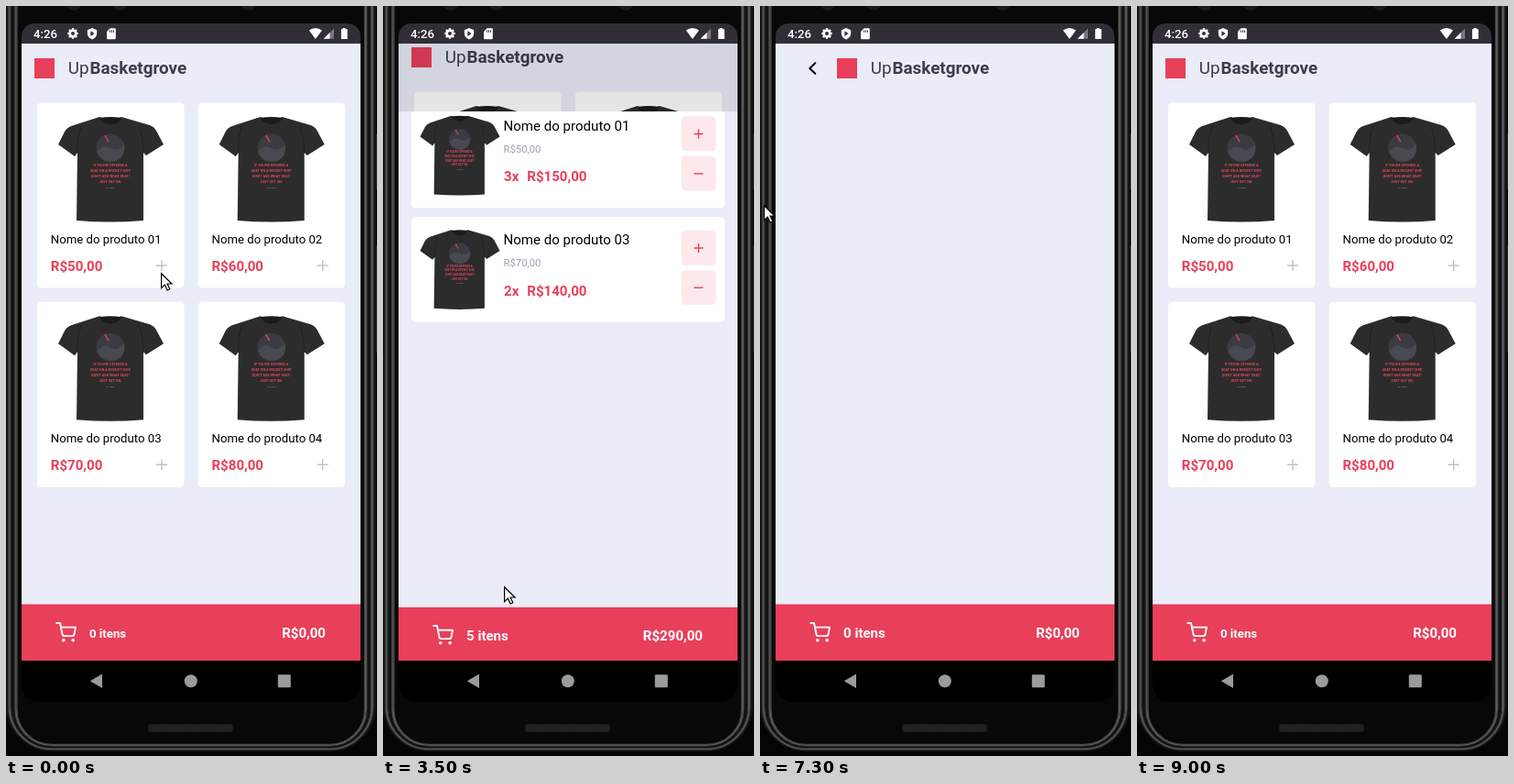
Animation, 405 px wide and 818 px high, one loop 10000 ms. Source, as an HTML page with a canvas:

```html
<!DOCTYPE html>
<html lang="pt">
<head>
<meta charset="utf-8">
<title>UpBasketgrove</title>
<style>
  html, body { margin: 0; width: 100%; height: 100%; overflow: hidden; background: #050505; }
  canvas { display: block; width: 405px; height: 818px; }
</style>
</head>
<body>
<canvas id="stage"></canvas>
<script>
const W = 405, H = 818, LOOP = 10000, STEP = 100;
const RED = '#e83f5b', BG = '#eaecf8', PINK = '#fde9ec', INK = '#3d3d4d';
const SMALL = 13.19, MEDIUM = 15.07, LARGE = 18.84;
const LEFT = 17, TOP = 41, WIDTH = 370, VIEW = 673;  // app area between the system bars
const HOLD = 200, TRAVEL = 400;                      // length of a press, longest pointer trip
const canvas = document.getElementById('stage');
const ratio = window.devicePixelRatio || 1;
canvas.width = W * ratio;
canvas.height = H * ratio;
const c = canvas.getContext('2d');

// Press times of each button
const presses = {
  plus1: [600, 900, 1100], minus1: [5600, 5800, 6400],
  plus3: [2000, 2200], minus3: [4600, 4900]
};
const done = (button, t) => presses[button].filter(p => t >= p + HOLD).length;
const quantity = (id, t) => done('plus' + id, t) - done('minus' + id, t);
const opacity = (button, t) =>
  (presses[button] || []).some(p => t >= p && t < p + HOLD) ? .35 : 1;

// Pointer stops: arrival time and place
const stops = [
  [0, 169, 291], [600, 173, 283], [2000, 166, 495], [3200, 128, 688], [3500, 132, 633],
  [3900, 112, 365], [4100, 72, 64], [4400, 346, 313], [5600, 336, 185], [6900, 0, 19],
  [7100, 4, 217], [7700, 79, 92], [8100, 61, 63], [8900, 76, 21]
];
function pointerAt(t) {
  let [, x, y] = stops[0];
  for (let i = 1; i < stops.length; i++) {
    const [end, px, py] = stops[i];
    const trip = Math.min(TRAVEL, end - stops[i - 1][0]);
    const f = Math.max(0, Math.min(1, (t - end) / trip + 1));
    x += (px - x) * f;
    y += (py - y) * f;
  }
  return [x, y];
}

// Cubic bezier easing of the screen change
const bezier = (s, a, b) => 3 * s * (1 - s) ** 2 * a + 3 * s * s * (1 - s) * b + s ** 3;
function ease(x) {
  if (x <= 0) return 0;
  if (x >= 1) return 1;
  let lo = 0, hi = 1;
  for (let i = 0; i < 20; i++) {
    const mid = (lo + hi) / 2;
    if (bezier(mid, .20833, .25) < x) lo = mid; else hi = mid;
  }
  return bezier(lo, .82, 1);
}
const slide = (t, start) => ease((t - start) / 425);

const money = n => `R$${n},00`;

function box(x, y, w, h, r, fill, stroke, lw = 1) {
  c.beginPath();
  c.roundRect(x, y, w, h, r);
  if (fill) { c.fillStyle = fill; c.fill(); }
  if (stroke) { c.strokeStyle = stroke; c.lineWidth = lw; c.stroke(); }
}
function disc(x, y, r, fill) {
  c.beginPath();
  c.arc(x, y, r, 0, 7);
  c.fillStyle = fill;
  c.fill();
}
function shape(d, fill) {
  c.fillStyle = fill;
  c.fill(new Path2D(d));
}
function line(d, color, lw) {
  c.strokeStyle = color;
  c.lineWidth = lw;
  c.stroke(new Path2D(d));
}
function text(s, x, y, size, weight, color, align = 'left') {
  c.font = `${weight} ${size}px Roboto, sans-serif`;
  c.textAlign = align;
  c.fillStyle = color;
  c.fillText(s, x, y);
}
function placed(x, y, scale, draw) {
  c.save();
  c.translate(x, y);
  c.scale(scale, scale);
  draw();
  c.restore();
}
function faded(alpha, draw) {
  c.save();
  c.globalAlpha = alpha;
  draw();
  c.restore();
}

function shirt(x, y, scale) {
  placed(x, y, scale, () => {
    shape('M45 0L14 10Q9 12 7 16L0 30 18 43 21 39 20 113Q57 116 93 113L93 39 96 42 115 30 107 15Q105 11 100 9L69 0Q57 5 45 0Z', '#2c2c2c');
    shape('M45 1Q57-1 69 1 66 8 57 8 48 8 45 1Z', '#1b1b1b');
    line('M21 39Q20 24 25 10M93 39Q93 24 88 9', '#222', 1.2);
    disc(57, 34, 15.5, '#3b3b42');
    shape('M42 38Q50 29 57 34T72 30Q74 44 62 48 48 50 42 38Z', '#494952');
    line('M51 20L55 27', RED, 1.4);
    ['IF YOU\'RE OFFERED A', 'SEAT ON A ROCKET SHIP,', 'DON\'T ASK WHAT SEAT!', 'JUST GET ON.']
      .forEach((s, i) => text(s, 57, 53.5 + i * 6.1, 3.8, 700, '#e0475d', 'center'));
    text('An Author', 57, 77.5, 2.3, 400, '#aaa', 'center');
  });
}

function sign(x, y, r, color, isPlus) {
  line(`M${x - r} ${y}h${2 * r}` + (isPlus ? `M${x} ${y - r}v${2 * r}` : ''), color, 1.4);
}

function brand(x) {
  box(x, 57, 22, 22, 0, RED);
  text('Up', x + 36.8, 74.2, LARGE, 400, INK);
  text('Basketgrove', x + 60.5, 74.2, LARGE, 700, INK);
}

function cartBar(items, total, size) {
  box(LEFT, 652.6, WIDTH, 62, 0, RED);
  placed(54.3, 672, .942, () => {
    c.lineCap = c.lineJoin = 'round';
    line('M1 1h4l2.68 13.39a2 2 0 0 0 2 1.61h9.72a2 2 0 0 0 2-1.61L23 6H6', '#fff', 2);
    disc(9, 21, 1.9, '#fff');
    disc(20, 21, 1.9, '#fff');
  });
  text(`${items} itens`, 91, 684 + size * .355, size, 700, '#fff');
  text(money(total), 349, 689.3, MEDIUM, 700, '#fff', 'right');
}

function home(items, total, t) {
  box(LEFT, TOP, WIDTH, 700, 0, BG);
  brand(31);
  for (let i = 0; i < 4; i++) {
    const x = 34 + (i % 2) * 175.7, y = 105.5 + (i >> 1) * 217.2;
    box(x, y, 160.5, 202, 4.5, '#fff');
    shirt(x + 23, y + 15.5, 1);
    text(`Nome do produto 0${i + 1}`, x + 14.8, y + 153.6, SMALL, 400, '#000');
    text(money(50 + i * 10), x + 14.8, y + 183, MEDIUM, 700, RED);
    faded(opacity('plus' + (i + 1), t), () => sign(x + 136, y + 177.5, 6, '#c2c2c6', true));
  }
  cartBar(items, total, SMALL);
}

function cartRow(y, id, qty, t) {
  const price = 40 + id * 10;
  box(31, y, 342, 114.5, 4.5, '#fff');
  shirt(40.5, y + 14, .757);
  text(`Nome do produto 0${id}`, 131.5, y + 30.2, MEDIUM, 400, '#000');
  text(money(price), 131.5, y + 54, 11.3, 400, '#a0a0b2');
  text(`${qty}x`, 132, y + 85.4, MEDIUM, 700, RED);
  text(money(price * qty), 157.3, y + 85.4, MEDIUM, 700, RED);
  ['plus', 'minus'].forEach((name, i) => {
    const top = y + 14.5 + i * 43.3;
    faded(name === 'minus' ? opacity(name + id, t) : 1, () => {
      box(325.8, top, 37.7, 38, 4.5, PINK);
      sign(344.5, top + 19.2, 5, RED, name === 'plus');
    });
  });
}

function cart(items, total, t) {
  box(LEFT, TOP, WIDTH, 700, 0, BG);
  if (t >= 8300 && t < 8600) disc(57.3, 68, 12.3, 'rgba(0,0,0,.32)');
  c.lineCap = c.lineJoin = 'round';
  line('M60.3 62.2L54.3 68 60.3 73.8', '#000', 2);
  c.lineCap = 'butt';
  brand(84);
  [1, 3].forEach((id, i) => {
    const qty = quantity(id, t);
    if (qty) cartRow(102.8 + i * 124.4, id, qty, t);
  });
  cartBar(items, total, MEDIUM);
}

function phone() {
  box(0, 0, W, H, 0, '#050505');
  box(402, 140, 4, 60, 1, '#2e2e2e');
  box(402, 261, 4, 117, 1, '#2e2e2e');
  // metal rim with two lighter ridges
  for (let i = 0; i <= 12; i++) {
    const v = 18 + 80 * Math.sin((i - .5) * Math.PI / 7) ** 4;
    box(i, -60, W - 1.5 - 2 * i, 872.5 - i * .6, 50 - i, '#080808', `rgb(${v},${v},${v})`, 1.3);
  }
  for (const x of [74, 124, 265]) disc(x, -3, 8, '#191919');
  box(155, 783, 93, 9, 3, '#1d1d1d');
  c.setLineDash([1, 1]);
  line('M157 785.5h89M157 787.5h89M157 789.5h89', '#303030', 1);
  c.setLineDash([]);
  box(LEFT, 19, WIDTH, 740, [14, 14, 20, 20], '#000');
}

function systemBars() {
  box(LEFT, 19, WIDTH, 22, [14, 14, 0, 0], '#312e38');
  text('4:26', 30, 35, SMALL, 500, '#fff');
  // settings gear
  for (let i = 0; i < 8; i++) {
    const a = i * Math.PI / 4;
    disc(73 + 4.6 * Math.cos(a), 30 + 4.6 * Math.sin(a), 1.3, '#fff');
  }
  disc(73, 30, 4.6, '#fff');
  disc(73, 30, 2, '#312e38');
  // shield and memory card
  shape('M94 24l5.2 2.2v3.6q0 4.5-5.2 6.6q-5.2-2.1-5.2-6.6v-3.6z', '#fff');
  shape('M92.4 27.3l4.2 2.8-4.2 2.8z', '#312e38');
  shape('M113.6 24.2h5.2q1 0 1 1v10q0 1-1 1h-7.8q-1 0-1-1v-7.2z', '#fff');
  line('M113.7 26.4v2.4M115.6 26.4v2.4M117.5 26.4v2.4', '#312e38', 1);
  // wifi, signal, battery
  shape('M330.8 26.6q7-5 14.2 0l-7.1 9.3z', '#fff');
  shape('M358 24.5v11.3h-11.3z', '#77757c');
  shape('M353.5 29v6.8h-6.8z', '#fff');
  shape('M367.6 24h3v1.3h2.1v10.7h-6.8v-10.7h1.7z', '#fff');
  // navigation
  box(LEFT, TOP + VIEW, WIDTH, 45, [0, 0, 20, 20], '#000');
  shape('M91.8 736.3L105 728.6v15.4z', '#9b9b9b');
  disc(201.8, 736.2, 7, '#9b9b9b');
  box(296.8, 729.2, 14, 14, 1.2, '#9b9b9b');
}

function arrow(x, y) {
  placed(x, y, 1, () => {
    const d = 'M.6 .8V16.6L4.3 13.1 7.1 19 9.8 17.8 7.1 12H12Z';
    c.lineJoin = 'miter';
    shape(d, '#fff');
    line(d, '#000', 1.2);
  });
}

function draw(t) {
  const one = quantity(1, t), three = quantity(3, t);
  const items = one + three, total = one * 50 + three * 70;
  const open = slide(t, 3333) - slide(t, 8380);

  c.setTransform(ratio, 0, 0, ratio, 0, 0);
  c.lineCap = 'butt';
  c.lineJoin = 'miter';
  phone();

  c.save();
  c.beginPath();
  c.rect(LEFT, TOP, WIDTH, VIEW);
  c.clip();
  if (open < 1) {
    placed(0, -VIEW * .02 * open, 1, () => home(items, total, t));
    box(LEFT, TOP, WIDTH, VIEW, 0, `rgba(0,0,0,${Math.min(open / .36, 1) * .1})`);
  }
  if (open > 0) {
    const drop = VIEW * (1 - open);
    c.beginPath();
    c.rect(LEFT, TOP + drop, WIDTH, VIEW);
    c.clip();
    placed(0, drop * .041, 1, () => cart(items, total, t));
  }
  c.restore();

  systemBars();
  if (t < 9000) arrow(...pointerAt(t));
}

function tick(now) {
  draw(Math.floor(now % LOOP / STEP) * STEP);
  requestAnimationFrame(tick);
}
draw(0);
requestAnimationFrame(tick);
</script>
</body>
</html>
```
